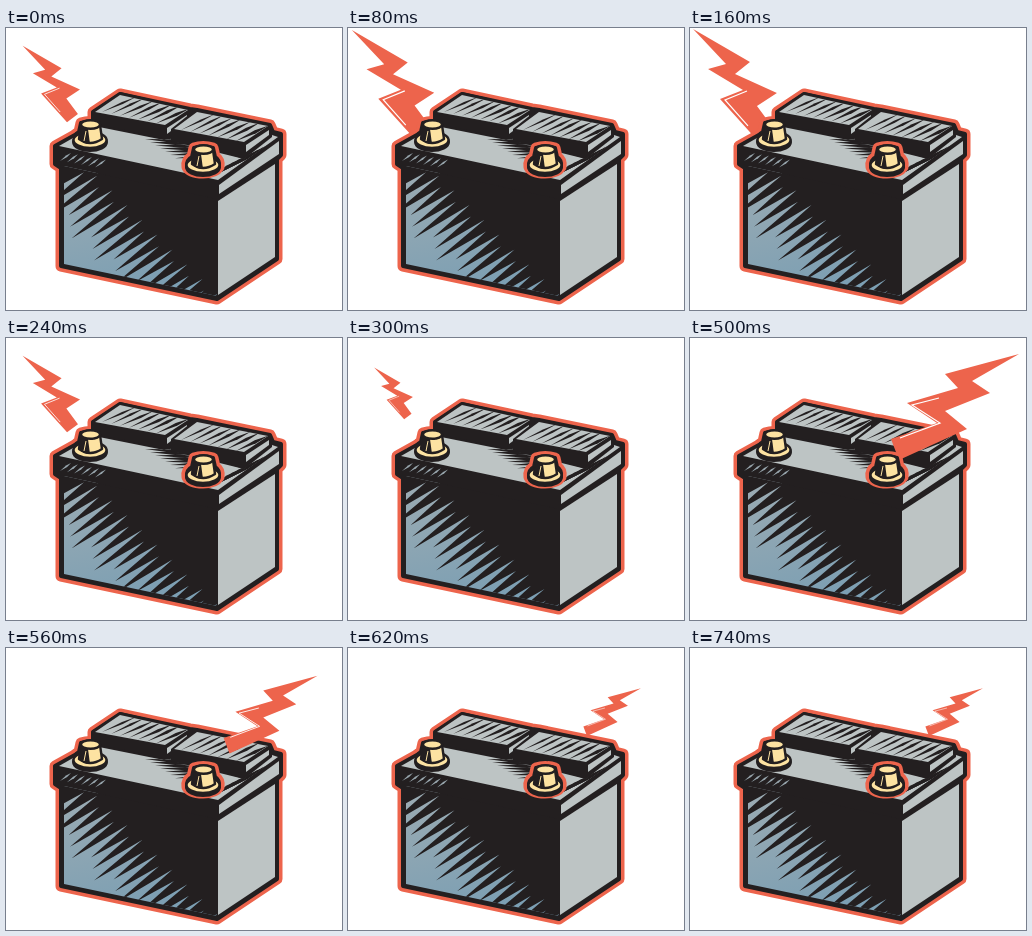
An HTML page for the animation above (0.76 s loop, 336 by 282 pixels).

```html
<!DOCTYPE html>
<html lang="en">
<head>
<meta charset="utf-8">
<title>Battery</title>
<style>
  html, body { margin: 0; width: 100%; height: 100%; overflow: hidden; background: #fff; }
  svg { display: block; width: 100vw; height: 100vh; }
  .ink { fill: #231f20; }
  .grey { fill: #bdc4c4; }
  .red { fill: #ed644c; }
  .halo { fill: #ed644c; stroke: #ed644c; stroke-width: 11; stroke-linejoin: round; }
  .edge { fill: #231f20; stroke: #231f20; stroke-width: 4; stroke-linejoin: round; }
  .cream { fill: #fde3a2; stroke: #231f20; stroke-width: 2.4; stroke-linejoin: round; }
  .shine { fill: none; stroke: #fff; stroke-width: 1.2; }
</style>
</head>
<body>
<svg viewBox="0 0 336 282">
  <defs>
    <linearGradient id="steel" x1="0" y1="0" x2="0.25" y2="1">
      <stop offset="0" stop-color="#9dacb3"/>
      <stop offset="1" stop-color="#7c9fb3"/>
    </linearGradient>
    <path id="body" d="M114 66 L184 81 L191 82 L264 97 L267 104 L275 106 V127 L271 131 V231 L211 271 L55 238 V140 L49 136 V118 L67 108 L87 97 V84 Z"/>
    <clipPath id="front"><path d="M58 138 L211 171 V268 L58 236 Z"/></clipPath>
    <clipPath id="lid"><path id="lidTop" d="M53 118 L88 98 L158 112 L170 110 L238 131 L266 107 L272 109 L212 152 Z"/></clipPath>
    <clipPath id="cellA"><path id="topA" d="M114 67 L182 82 L159 97 L89 84 Z"/></clipPath>
    <clipPath id="cellB"><path id="topB" d="M191 84 L262 98 L238 114 L168 101 Z"/></clipPath>
    <g id="post">
      <ellipse class="edge" cy="3" rx="16" ry="8"/>
      <ellipse class="cream" cy="1" rx="16.5" ry="8"/>
      <path class="cream" d="M-9 -14 L-11 0 Q0 8 12 0 L10 -14 Z"/>
      <path class="ink" d="M-9 -13 L-11 0 Q-7 5 0 5 L-2 -10 Z"/>
      <path d="M-4 -8 L-6 2" stroke="#fde3a2"/>
      <ellipse class="cream" cx=".5" cy="-14.5" rx="9.5" ry="4.3"/>
    </g>
    <path id="postShape" d="M-9 -16 Q0 -19 10 -16 L12 -7 Q17 -4 16 3 Q12 9 0 9 Q-13 9 -16 3 Q-17 -4 -11 -7 Z"/>
  </defs>

  <g id="left">
    <path class="red" d="M3 1 L60 34 L45 46 L87 65 L67 78 L84 101 L68 113 L30 71 L53 62 L18 41 L36 36 Z"/>
    <path class="shine" d="M57 63 L35 72 L58 98"/>
  </g>

  <use href="#body" class="halo"/>
  <use href="#postShape" class="halo" x="84" y="111"/>
  <use href="#postShape" class="edge" x="84" y="111"/>
  <use href="#body" class="edge"/>

  <!-- lid -->
  <use href="#lidTop" class="grey"/>
  <g id="lidHatch" class="ink" clip-path="url(#lid)"></g>
  <path class="grey" d="M213 157 L273 113 V126 L213 166 Z"/>
  <g id="bandHatch" fill="#98a6ad"></g>

  <!-- case -->
  <path class="grey" d="M212 173 L269 136 V229 L212 267 Z"/>
  <g clip-path="url(#front)">
    <path fill="url(#steel)" d="M57 138 L84 138 L211 262 V269 L57 237 Z"/>
    <path id="shade" class="ink"/>
  </g>

  <!-- cells -->
  <path class="ink" d="M86 83 L114 64 L187 81 L185 92 L160 111 L86 95 Z"/>
  <use href="#topA" class="grey"/>
  <path class="grey" d="M161 100 L181 87 V91 L161 106 Z"/>
  <g id="hatchA" class="ink" clip-path="url(#cellA)"></g>
  <path class="ink" d="M165 101 L190 81 L266 97 V109 L238 131 L165 113 Z"/>
  <use href="#topB" class="grey"/>
  <path class="grey" d="M240 117 L263 102 V107 L240 124 Z"/>
  <g id="hatchB" class="ink" clip-path="url(#cellB)"></g>

  <use href="#post" x="84" y="111"/>
  <use href="#postShape" class="halo" x="197" y="136"/>
  <g id="right">
    <path class="red" d="M329 16 L255 36 L268 50 L217 65 L247 85 L201 101 L209 122 L277 91 L255 73 L300 55 L282 43 Z"/>
    <path class="shine" d="M249 60 L222 67 L250 85 L210 100"/>
  </g>
  <use href="#postShape" class="edge" x="197" y="136"/>
  <use href="#post" x="197" y="136"/>
</svg>
<script>
const LOOP = 760;
const $ = id => document.getElementById(id);

// Tapered stroke: thick in the middle, pointed at both ends.
function lens(x, y, dx, dy, w) {
  const len = Math.hypot(dx, dy), nx = -dy / len * w, ny = dx / len * w;
  const mx = x + dx * 0.6, my = y + dy * 0.6;
  return `<path d="M${x} ${y}L${mx + nx} ${my + ny}L${x + dx} ${y + dy}L${mx - nx} ${my - ny}Z"/>`;
}

function hatch(id, count, make) {
  $(id).innerHTML = Array.from({ length: count }, (_, i) => lens(...make(i))).join("");
}

hatch("hatchA", 9, i => [96 + i * 9, 84 + i * 1.9, 34, -15 - i % 2, 1 + i * 0.1]);
hatch("hatchB", 9, i => [175 + i * 9, 102 + i * 1.9, 34, -16 - i % 2, 1 + i * 0.1]);
hatch("lidHatch", 14, i => i < 7
  ? [139 + i * 5, 111 + i * 3.2, 42, 3 - i, 1.6]
  : [201 + (i - 7) * 6, 151 - (i - 7) * 3, 34, -20, 1.6]);
hatch("bandHatch", 6, i => [54 + i * 7, 133 + i * 1.3, 11, -8, 0.9]);

// Jagged border between the dark and the lit part of the case.
let border = "M57 130";
for (let i = 0; i < 19; i++) {
  const x = 60 + i * 7.5, y = 151 + i * 7.4, out = 20 + i % 3 * 6, back = 14 + i % 2 * 6;
  border += `L${x - out} ${y + out * 0.7}L${x + 4 + back} ${y + 3 - back * 0.7}`;
}
$("shade").setAttribute("d", border + "L215 285V130Z");

// Half-cosine easing between [time, scale] extremes.
function pulse(keys, t) {
  let i = 0;
  while (i < keys.length - 2 && t > keys[i + 1][0]) i++;
  const [t0, a] = keys[i], [t1, b] = keys[i + 1];
  return a + (b - a) * (1 - Math.cos(Math.PI * (t - t0) / (t1 - t0))) / 2;
}

const bolts = [
  { el: $("left"), x: 46, y: 54, from: 0, to: 420,
    keys: [[-95, 0.45], [125, 1.04], [335, 0.42], [575, 0.84]] },
  { el: $("right"), x: 263.5, y: 60, from: 340, to: LOOP,
    keys: [[220, 0.33], [450, 1.085], [680, 0.33], [910, 1.085]] }
];

function draw(time) {
  const t = Math.floor(time % LOOP / 20) * 20;
  for (const { el, x, y, from, to, keys } of bolts) {
    el.style.display = t >= from && t < to ? "" : "none";
    el.setAttribute("transform", `translate(${x} ${y}) scale(${pulse(keys, t)}) translate(${-x} ${-y})`);
  }
}

const start = performance.now();
function tick() {
  draw(performance.now() - start);
  requestAnimationFrame(tick);
}
tick();
</script>
</body>
</html>
```
